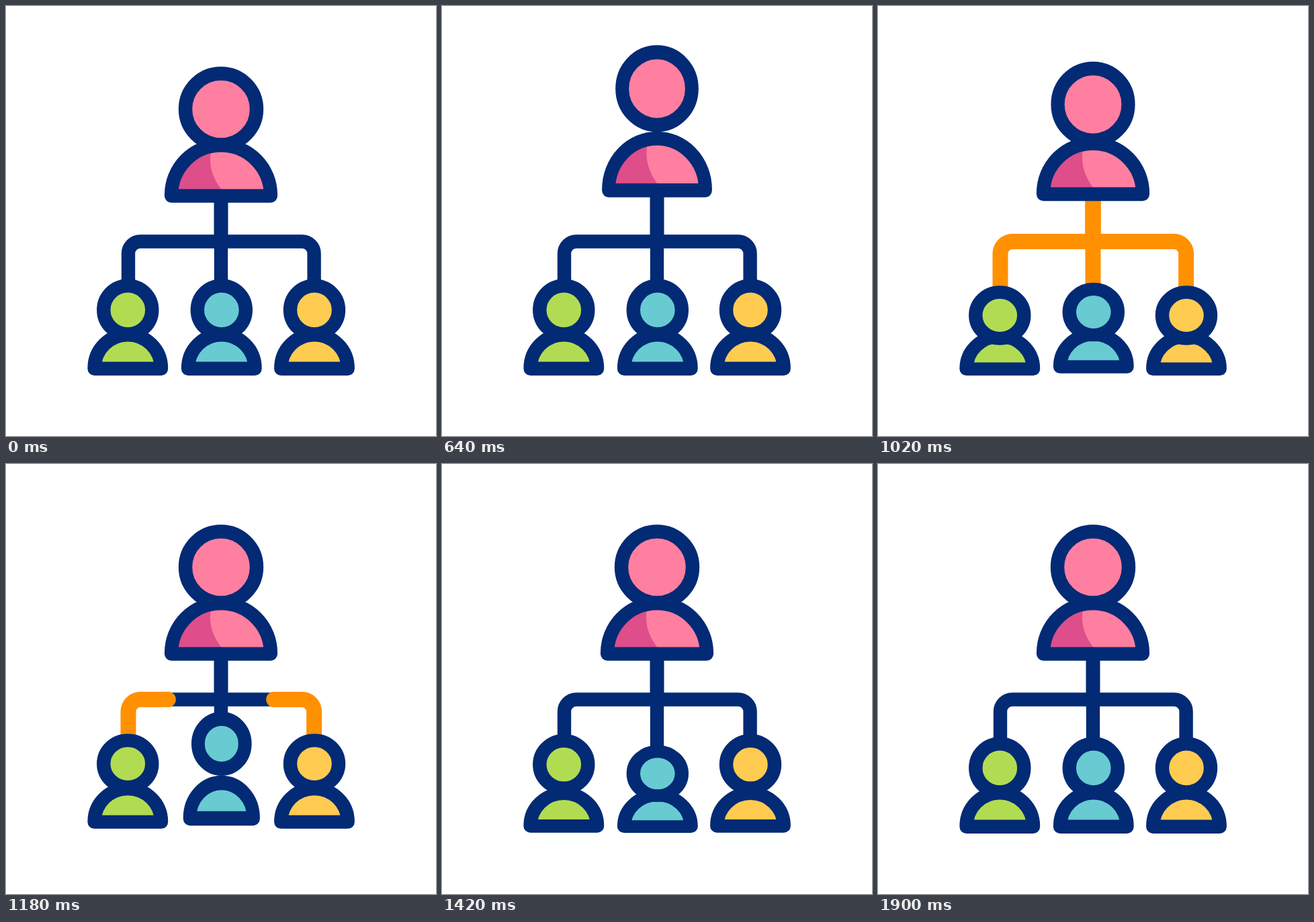
Animation of 640x640 px, one loop 1.96 s. Source, as an HTML page with a canvas:

```html
<!DOCTYPE html>
<html lang="en">
<head>
<meta charset="utf-8">
<title>Team hierarchy</title>
<style>
  html, body { margin: 0; width: 100%; height: 100%; overflow: hidden; background: #fff; }
  canvas { display: block; width: 100%; height: 100%; }
</style>
</head>
<body>
<canvas id="stage" width="640" height="640"></canvas>
<script>
const ctx = document.getElementById('stage').getContext('2d');
const LOOP = 1960;
const NAVY = '#032a75', ORANGE = '#ff9100';
const LINE = 20.4;

const boss = {
  x: 320, bottom: 292.8, headY: 153.5, headR: 53, bodyR: 73.9, side: 1.4,
  color: '#ff7fa0', shade: '#dd4e8a', start: 240
};
const child = (x, color, start) => ({
  x, bottom: 550, headY: 452.4, headR: 36, bodyR: 49.7, side: 0.9, color, start
});
const people = [
  boss,
  child(181.3, '#b1dc52', 950),
  child(320.8, '#67cbd1', 820),
  child(459, '#ffcb51', 950)
];

const TRUNK = 'M320 280V';
const branch = (x, side) => new Path2D(
  `${TRUNK}350.5H${x - side * 18}A18 18 0 0 ${side > 0 ? 1 : 0} ${x} 368.5V432`);
const wires = [
  { path: branch(182, -1), length: 281 },
  { path: new Path2D(TRUNK + 432), length: 152 },
  { path: branch(458.6, 1), length: 281 }
];

function ease(time, from, to) {
  const u = Math.min(1, Math.max(0, (time - from) / (to - from)));
  return (1 - Math.cos(Math.PI * u)) / 2;
}

// Eases from 0 at time 0 through each [time, value] turning point.
function swing(time, ...turns) {
  let value = 0, from = 0, previous = 0;
  for (const [to, target] of turns) {
    value += (target - previous) * ease(time, from, to);
    from = to;
    previous = target;
  }
  return value;
}

// Crouch, jump, land, small rebound; the body leaves the ground before the head peaks.
const hop = time => ({
  headY: swing(time, [130, 14], [360, -36], [550, 13], [720, -9.5], [900, 0]),
  headStretch: swing(time, [130, -0.075], [360, 0.03], [600, -0.085], [760, 0.01], [900, 0]),
  bodyY: swing(time, [150, 0], [310, -14], [510, 0], [570, 0], [690, -6], [860, 0]),
  bodyStretch: swing(time, [130, -0.08], [340, 0.05], [560, -0.085], [760, 0])
});

function drawWires(time) {
  ctx.lineCap = 'butt';
  ctx.lineWidth = LINE;
  ctx.strokeStyle = NAVY;
  for (const wire of wires) ctx.stroke(wire.path);

  const front = 268 * ease(time, 720, 1000);
  const tail = 268 * ease(time, 988, 1348);
  ctx.lineCap = 'round';
  ctx.lineWidth = 23;
  ctx.strokeStyle = ORANGE;
  for (const { path, length } of wires) {
    const size = Math.min(front, length) - tail;
    if (size < 1) continue;
    ctx.setLineDash([size, 1000]);
    ctx.lineDashOffset = -tail;
    ctx.stroke(path);
  }
  ctx.setLineDash([]);
}

function drawBody({ bodyR, side, color, shade }) {
  const base = -LINE / 2;
  const dome = new Path2D();
  dome.moveTo(-bodyR, base);
  dome.arc(0, base - side, bodyR, Math.PI, 2 * Math.PI);
  dome.lineTo(bodyR, base);
  dome.closePath();
  ctx.fillStyle = color;
  ctx.fill(dome);
  if (shade) {
    ctx.save();
    ctx.clip(dome);
    ctx.fillStyle = shade;
    ctx.fill(new Path2D('M-90 -80H-14C-20 -56 -12 -36 1 -19H-90Z'));
    ctx.restore();
  }
  ctx.stroke(dome);
}

function drawHead({ headR, color }) {
  ctx.beginPath();
  ctx.arc(0, 0, headR, 0, 2 * Math.PI);
  ctx.fillStyle = color;
  ctx.fill();
  ctx.stroke();
}

// A part grows narrower while stretched but does not widen when squashed.
function placed(x, y, stretch, draw) {
  ctx.save();
  ctx.translate(x, y);
  ctx.scale(1 - Math.max(0, stretch), 1 + stretch);
  draw();
  ctx.restore();
}

function drawPerson(person, time) {
  const { headY, headStretch, bodyY, bodyStretch } = hop(time - person.start);
  ctx.lineWidth = LINE;
  ctx.strokeStyle = NAVY;
  placed(person.x, person.bottom + bodyY, bodyStretch, () => drawBody(person));
  placed(person.x, person.headY + headY, headStretch, () => drawHead(person));
}

function render(now) {
  const time = now % LOOP;
  ctx.fillStyle = '#fff';
  ctx.fillRect(0, 0, 640, 640);
  drawWires(time);
  for (const person of people) drawPerson(person, time);
}

ctx.lineJoin = 'round';
const begin = performance.now();
function tick() {
  render(performance.now() - begin);
  requestAnimationFrame(tick);
}
tick();
</script>
</body>
</html>
```
